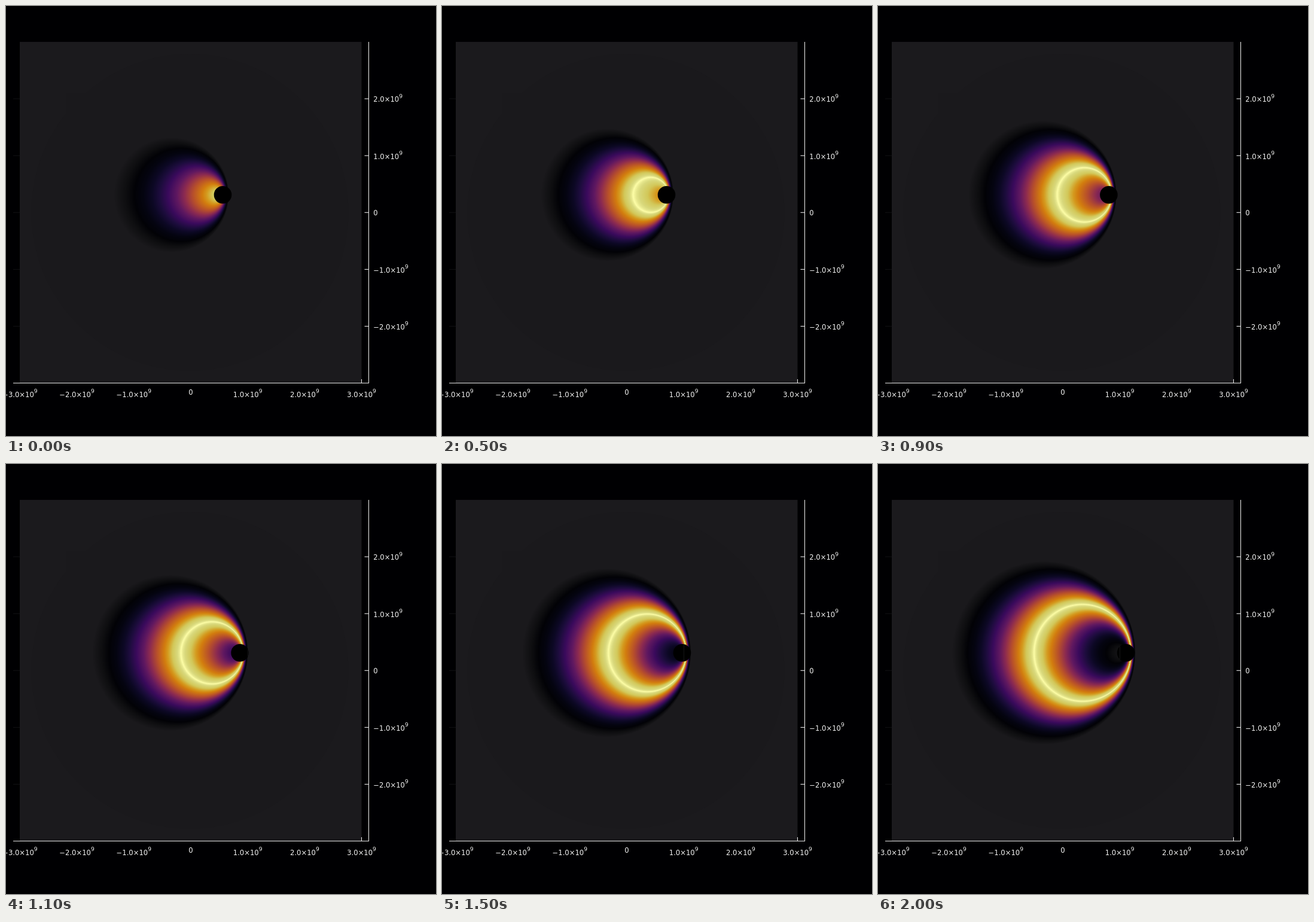
An HTML page with a canvas for the animation above (2100 ms loop, 719 by 719 pixels).

```html
<!DOCTYPE html>
<html lang="en">
<head>
<meta charset="utf-8">
<title>Wavefront field</title>
<style>
  html, body { margin: 0; width: 100%; height: 100%; overflow: hidden; background: #000002; }
  #stage { position: relative; width: 719px; height: 719px; overflow: hidden; }
  svg, canvas { position: absolute; left: 0; top: 0; display: block; }
  text { font-family: "DejaVu Sans", sans-serif; font-size: 11.6px; fill: #f2f2f2; }
  .sup { font-size: 9.2px; }
</style>
</head>
<body>
<div id="stage">
  <svg width="719" height="719">
    <rect x="23" y="60" width="571.5" height="570" fill="#1b1a1d"/>
    <circle cx="307.5" cy="345" r="265" fill="#1a191c"/>
  </svg>
  <canvas id="field" width="350" height="340"></canvas>
  <svg id="axes" width="719" height="719"></svg>
</div>
<script>
const STEP = 100, STEPS = 21;
const LEFT = 100, TOP = 146, SOURCE_Y = 315.8, HOLE = 14.8;
const BETA = 0.895; // source speed relative to the wave speed

// Colour by distance from the bright wavefront
const STOPS = [
  [0, 'fdfda6'], [1.5, 'e6e68c'], [3, 'd8d87c'], [7, 'd2c85a'], [11, 'd49a1e'],
  [14, 'd27c0e'], [20, 'b8502a'], [26, '8c2a50'], [31, '601860'], [37, '3a0a5c'],
  [43, '1c0c3c'], [48, '0c0824'], [54, '040410'], [60, '020206'], [66, '0e0e10'], [74, '1a191c']
].map(([at, hex]) => [at, [0, 2, 4].map(i => parseInt(hex.slice(i, i + 2), 16))]);

// step, front radius, outer spread, inner spread
const KEYS = [
  [0, 0, 1.3, 1.5], [2, 7, 1.3, 1.5], [5, 29.5, 1.1, 1.8], [9, 45.5, 1.06, 1.3],
  [13, 58.5, 1.06, 1.12], [17, 71.5, 1, 1.08], [20, 81, 0.98, 1.06]
];

const mix = (a, b, t) => a + (b - a) * t;

function between(list, x) {
  let i = 1;
  while (i < list.length - 1 && list[i][0] < x) i++;
  const a = list[i - 1], b = list[i];
  return [a, b, Math.min(1, (x - a[0]) / (b[0] - a[0]))];
}

const FINE = 10;
const palette = Array.from({ length: 74 * FINE + 1 }, (_, i) => {
  const [a, b, t] = between(STOPS, i / FINE);
  return a[1].map((v, c) => Math.round(mix(v, b[1][c], t)));
});

const canvas = document.getElementById('field');
const ctx = canvas.getContext('2d');
const { width, height } = canvas;
canvas.style.left = LEFT + 'px';
canvas.style.top = TOP + 'px';
const image = ctx.createImageData(width, height);

function drawField(step) {
  const [a, b, t] = between(KEYS, step);
  const [front, outer, inner] = [1, 2, 3].map(i => mix(a[i], b[i], t));
  const sourceX = 362.5 + 2.6 * step - LEFT;
  const sourceY = SOURCE_Y - TOP;
  const g = 1 - BETA * BETA;
  const data = image.data;
  for (let y = 0, p = 0; y < height; y++) {
    const dy = y + 0.5 - sourceY;
    for (let x = 0; x < width; x++, p += 4) {
      const dx = x + 0.5 - sourceX, bx = BETA * dx;
      // radius of the wave circle passing through this point
      const r = (bx + Math.sqrt(bx * bx + g * (dx * dx + dy * dy))) / g;
      const d = r > front ? (r - front) / outer : (front - r) / inner;
      const rgb = palette[Math.min(palette.length - 1, Math.round(d * FINE))];
      data[p] = rgb[0];
      data[p + 1] = rgb[1];
      data[p + 2] = rgb[2];
      data[p + 3] = 255;
    }
  }
  ctx.putImageData(image, 0, 0);

  ctx.fillStyle = '#000';
  ctx.beginPath();
  ctx.arc(sourceX, sourceY, HOLE, 0, 2 * Math.PI);
  ctx.fill();
  // grid line showing faintly through the dark disc
  ctx.save();
  ctx.clip();
  ctx.globalCompositeOperation = 'lighten';
  ctx.fillStyle = '#141416';
  ctx.fillRect(404 - LEFT, 0, 1, height);
  ctx.restore();
}

function buildAxes() {
  const line = (x1, y1, x2, y2, color = '#e6e6e6') =>
    `<path d="M${x1} ${y1}L${x2} ${y2}" stroke="${color}" stroke-width="1.1"/>`;
  const label = (n, x, y, anchor) => {
    const text = n ? `${n < 0 ? '−' : ''}${Math.abs(n)}.0×10<tspan class="sup" dy="-6.6">9</tspan>` : '0';
    return `<text x="${x}" y="${y}" text-anchor="${anchor}">${text}</text>`;
  };
  let out = line(606.5, 60, 606.5, 631) + line(12, 630.5, 607, 630.5) + line(594.5, 624, 594.5, 630);
  for (let n = -2; n <= 2; n++) {
    const y = 345.3 - 95.1 * n;
    out += line(599.5, y, 606.5, y) + line(12, y, 23, y, '#101012');
    out += label(n, 614.3, y + (n ? 5.3 : 4.4), 'start');
  }
  for (let n = -3; n <= 3; n++) out += label(n, 309 + 95.2 * n, n ? 653.8 : 650.2, 'middle');
  document.getElementById('axes').innerHTML = out;
}

let shown = -1;
const start = performance.now();
function tick() {
  const step = Math.floor((performance.now() - start) / STEP) % STEPS;
  if (step !== shown) drawField(shown = step);
  requestAnimationFrame(tick);
}

buildAxes();
tick();
</script>
</body>
</html>
```
